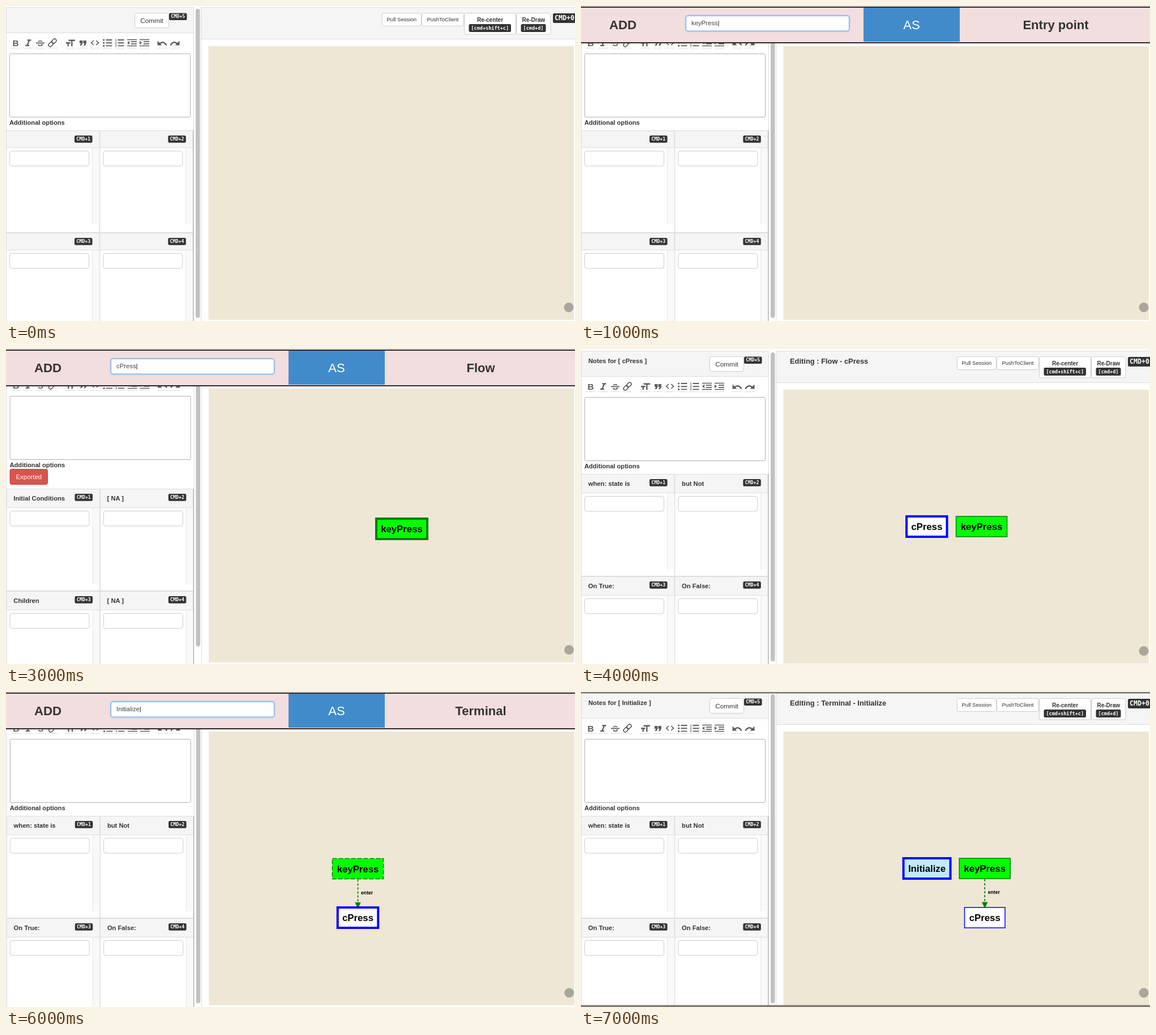
An HTML page that plays this animation: 1005 px wide and 557 px high, repeating every 8000 ms.

```html
<!DOCTYPE html>
<html lang="en">
<head>
<meta charset="utf-8">
<style>
  html, body { margin: 0; width: 100%; height: 100%; overflow: hidden; background: #fff; }
  svg { display: block; width: 1005px; height: 557px; }
  text { font-family: "Liberation Sans", Arial, sans-serif; white-space: pre; }
  .b { font-weight: bold; }
  .mono { font-family: "DejaVu Sans Mono", monospace; font-weight: bold; }
</style>
</head>
<body>
<svg id="stage" viewBox="0 0 1005 557"></svg>
<script>
const STEP = 1000;
const stage = document.getElementById('stage');

const rect = (x, y, w, h, fill, stroke = 'none', r = 0, extra = '') =>
  `<rect x="${x}" y="${y}" width="${w}" height="${h}" rx="${r}" fill="${fill}" stroke="${stroke}" ${extra}/>`;
const text = (s, x, y, size, { fill = '#333', cls = 'b', mid = false } = {}) =>
  `<text x="${x}" y="${y}" font-size="${size}" fill="${fill}" class="${cls}" text-anchor="${mid ? 'middle' : 'start'}">${s}</text>`;
const line = (d, stroke, w = 1, extra = '') =>
  `<path d="${d}" fill="none" stroke="${stroke}" stroke-width="${w}" ${extra}/>`;
const fillPath = (d, fill) => `<path d="${d}" fill="${fill}"/>`;

function badge(s, x, y, w, h, size) {
  return rect(x, y, w, h, '#333', 'none', 2.5) +
    text(s, x + w / 2, y + h / 2 + size * .33, size, { fill: '#fff', cls: 'mono', mid: true });
}

function button(s, x, y, w, h, size, cls = '') {
  return rect(x, y, w, h, '#fff', '#ccc', 3) +
    text(s, x + w / 2, y + (cls ? 15 : h / 2 + size * .34), size, { cls, mid: true });
}

// Editor icons, drawn around y = 65
function toolbar() {
  const ink = '#5c5c5c';
  const centres = [17, 39, 60.5, 82.5, 114, 135.5, 157, 179, 200.5, 222.5, 244.5, 276, 298];
  const rows = (x, ys) => ys.map(y => `M${x} ${y}h11`).join('');
  const indent = (x, arrow) =>
    line(`M${x} 59.5h17M${x} 70.5h17M${x + 7} 63.2h10M${x + 7} 66.8h10`, ink, 1.7) + fillPath(arrow, ink);
  const quote = x => fillPath(`M${x} 61h5.4v5l-2 4h-3l2-4h-2.4z`, ink);
  const undo = line('M271 67q7.5 -6.5 12.5 2.5', ink, 2.4) + fillPath('M267.5 61.5v8h8z', ink);
  return centres.map(c => line(`M${c - 9} 74.5h18`, '#ddd')).join('') +
    text('B', 17, 71, 15.5, { fill: ink, mid: true }) +
    line('M37.5 60.4h7M34 69.8h7M41 60.5L37.5 69.7', ink, 2.3) +
    text('S', 60.5, 71, 15, { fill: ink, mid: true }) +
    line('M53 65.3h15', '#fff', 4) + line('M53 65.5h15', ink, 1.8) +
    `<g transform="rotate(-45 82 65)">${rect(73.5, 62, 9, 6, 'none', ink, 3, 'stroke-width="1.6"')}${
      rect(81.5, 62, 9, 6, 'none', ink, 3, 'stroke-width="1.6"')}</g>` +
    line('M110.5 60.7h11.5M116.3 60.7v10.5M106 65.2h7.5M109.7 65v6.2', ink, 2.4) +
    quote(130) + quote(136.5) +
    line('M155 61l-4.3 4 4.3 4M159.2 61l4.3 4-4.3 4', ink, 1.7) +
    line(rows(176.5, [60, 65.2, 70.4]), ink, 1.9) +
    [60, 65.2, 70.4].map(y => `<circle cx="172.6" cy="${y}" r="1.6" fill="${ink}"/>`).join('') +
    line(rows(197.5, [60, 65.2, 70.4]), ink, 1.9) +
    [1, 2, 3].map(n => text(n, 192.5, 56.8 + n * 5.2, 5.5, { fill: ink })).join('') +
    indent(214, 'M214 65l4-3.3v6.6z') + indent(236, 'M240 65l-4-3.3v6.6z') +
    undo + `<g transform="matrix(-1 0 0 1 574 0)">${undo}</g>`;
}

function leftSide({ notes, titles, exported, active, item }) {
  const head = active ? '#d9edf7' : '#f5f5f5';
  const edge = active ? '#bce8f1' : '#ddd';
  const ink = active ? '#31708f' : '#333';
  const top = exported ? 248 : 220;
  const headH = titles ? 33 : 30;
  let out = rect(.5, 2.5, 331, 600, '#fff', edge) + rect(.5, 2.5, 331, 45, head, edge) +
    text(notes || '', 13, 24, 11.25, { fill: ink }) +
    button('Commit', 227.5, 12.5, 60, 26, 11.8, '').replace('y="29.5"', 'y="29.8"') +
    badge('CMD+5', 288, 12.5, 31.5, 12.5, 8.3) +
    toolbar() +
    rect(6.5, 84.5, 319, 112, '#fff', '#b0b0b0', 2) +
    text('Additional options', 6, 209.5, 11.15);
  if (exported) {
    out += rect(6.5, 213.5, 66.5, 27, '#d9534f', '#d43f3a', 3) +
      text('Exported', 39.8, 231.2, 11.4, { fill: '#fff', cls: '', mid: true });
  }
  for (let i = 0; i < 4; i++) {
    const x = i % 2 * 165.3, y = top + (i > 1 ? 181 : 0), body = y + headH;
    out += rect(x + .5, y + .5, 164.5, 180, '#fff', edge) +
      rect(x + 153, body, 11.5, 136, '#f9f9f9') + line(`M${x + 152.5} ${body}v136`, '#e6e6e6') +
      rect(x + .5, y + .5, 164.5, headH, head, edge) +
      text(titles ? titles[i] : '', x + 12.8, y + 20.5, 11.2, { fill: ink }) +
      badge('CMD+' + (i + 1), x + 121, y + 9, 31.5, 12.7, 8.3) +
      rect(x + 6.5, body + 6.5, 140, 26.5, '#fff', '#ccc', 3.5);
  }
  if (item) {
    out += rect(6, top + 250, 140, 25, '#d9edf7') + text(item, 10.5, top + 267, 11.2, { cls: '' });
  }
  return out + line(`M330.7 ${top}V560`, '#aaa') +
    rect(335, 5, 7.5, exported ? 522 : 546.5, '#c1c1c1', 'none', 3.7);
}

function rightSide({ heading, active }) {
  const head = active ? '#428bca' : '#f5f5f5';
  const edge = active ? '#428bca' : '#ddd';
  return rect(344.8, 2.5, 680, 600, '#fff', edge) + rect(344.8, 2.5, 680, 56, head, edge) +
    text(heading || '', 369, 25.3, 12.9, { fill: active ? '#fff' : '#333' }) +
    button('Pull Session', 664.3, 12.5, 69, 23, 9.6) +
    button('PushToClient', 734.3, 12.5, 74.2, 23, 9.5) +
    button('Re-center', 809.5, 12.5, 91, 37.5, 10, 'b') +
    button('Re-Draw', 901.5, 12.5, 60.5, 37.5, 10, 'b') +
    badge('[cmd+shift+c]', 817.5, 32, 74.5, 14, 8.5) +
    badge('[cmd+d]', 909.5, 32, 44, 14, 8.5) +
    badge('CMD+0', 966, 13, 41, 17, 11.6) +
    rect(357.5, 71, 645.5, 484, '#eee7d5') +
    '<circle cx="994" cy="533" r="8.5" fill="#aaa69b"/>';
}

const KINDS = {
  keyPress: { w: 90, fill: '#0f0', stroke: '#008000' },
  cPress: { w: 71.5, fill: '#fff', stroke: '#00f' },
  Initialize: { w: 83, fill: '#bfeaff', stroke: '#00f' }
};

function node([name, x, y, look]) {
  const { w, fill, stroke } = KINDS[name];
  const thick = look === 'selected' || look === 'faded';
  const dash = look === 'dashed' ? 'stroke-dasharray="8 3"' : '';
  return `<g opacity="${look === 'faded' ? .3 : 1}">` +
    rect(x - w / 2, y - 18, w, 36, fill.replace('#fff', look === 'faded' ? 'none' : '#fff'), stroke, 0,
      `stroke-width="${thick ? 4 : 1.5}" ${dash}`) +
    text(name, x, y + 6.2, 16.8, { fill: '#000', mid: true }) + '</g>';
}

const link = (x, y) =>
  line(`M${x} ${y + 19}v43`, '#008000', 1.7, 'stroke-dasharray="4 3"') +
  fillPath(`M${x - 5.2} ${y + 59.5}h10.4l-5.2 11z`, '#008000') +
  text('enter', x + 5.5, y + 45.3, 8.7, { fill: '#000' });

function addBar(name, kind) {
  return rect(0, 0, 1005, 66, '#fff') + rect(0, 1, 1005, 65, '#2b2629') + rect(0, 3, 1005, 61, '#f2dede') +
    rect(499, 3, 170, 60, '#428bca') +
    text('ADD', 74, 41, 22.2, { mid: true }) +
    rect(184.5, 16.5, 290, 28.5, 'none', '#66afe9', 5, 'stroke-width="3" opacity=".3"') +
    rect(185.5, 17.5, 288, 26.5, '#fff', '#66afe9', 3.5) +
    `<text x="195" y="34.3" font-size="11.3" fill="#444">${name}<tspan fill="#111">|</tspan></text>` +
    text('AS', 584, 41, 22, { fill: '#fff', cls: '', mid: true }) +
    text(kind, 838.5, 41, 22, { mid: true });
}

const entry = ['Initial Conditions', '[ NA ]', 'Children', '[ NA ]'];
const flow = ['when: state is', 'but Not', 'On True:', 'On False:'];
const first = {
  notes: 'Notes for [ keyPress ]', heading: 'Editing : Entry point - keyPress', titles: entry, exported: true,
  nodes: [['keyPress', 698.5, 319, 'selected']]
};
const linked = look => ({
  heading: 'Editing : Flow - cPress', link: [620.7, 313.5],
  nodes: [['keyPress', 620.7, 313.5, 'dashed'], ['cPress', 620.7, 400, look]]
});

const scenes = [
  {},
  { bar: ['keyPress', 'Entry point'] },
  { ...first, dx: .5, dy: -1 },
  { ...first, dx: .5, dy: -1, bar: ['cPress', 'Flow'] },
  { dy: 1, notes: 'Notes for [ cPress ]', heading: 'Editing : Flow - cPress', titles: flow,
    nodes: [['cPress', 610.7, 313, 'selected'], ['keyPress', 707.5, 313]] },
  { ...linked('faded'), dx: .5, dy: -2, notes: 'Notes', titles: entry, exported: true, active: true, item: 'cPress' },
  { ...linked('selected'), dx: .8, dy: -1, notes: 'Notes for [ cPress ]', titles: flow, bar: ['Initialize', 'Terminal'] },
  { dy: -1, notes: 'Notes for [ Initialize ]', heading: 'Editing : Terminal - Initialize', titles: flow, edges: true,
    link: [713.2, 313], nodes: [['Initialize', 611, 313, 'selected'], ['keyPress', 713.2, 313], ['cPress', 713.2, 400]] }
];

function draw(s) {
  stage.innerHTML =
    `<g transform="translate(${s.dx || 0} ${s.dy || 0})">` +
    leftSide(s) + rightSide(s) + (s.link ? link(...s.link) : '') + (s.nodes || []).map(node).join('') + '</g>' +
    (s.bar ? addBar(...s.bar) : '') +
    (s.edges ? rect(0, 0, 1005, 2.6, '#7f7a72') + rect(0, 553.6, 1005, 4, '#7f7a72') : '');
}

let shown = -1;
function tick() {
  const i = Math.floor(performance.now() / STEP) % scenes.length;
  if (i !== shown) draw(scenes[shown = i]);
  requestAnimationFrame(tick);
}
tick();
</script>
</body>
</html>
```
